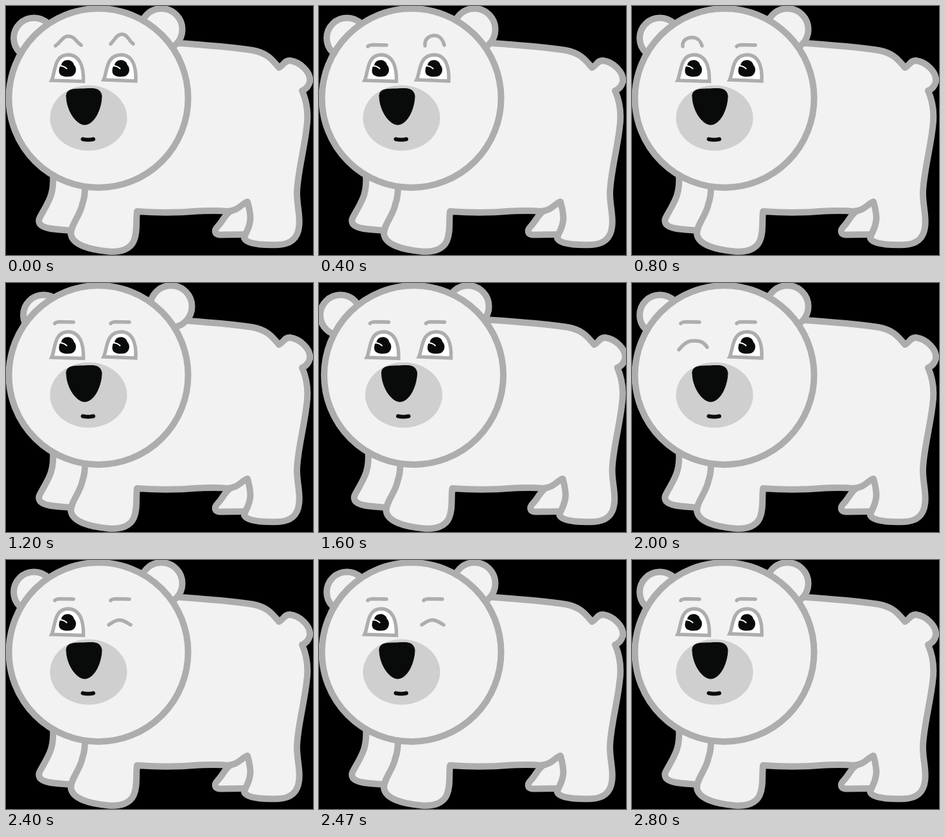
These frames come from a looping animation (478 by 388 pixels, 3.19 s). An HTML page with a canvas:

```html
<!DOCTYPE html>
<html lang="en">
<head>
<meta charset="utf-8">
<title>Polar bear</title>
<style>
html, body { margin: 0; width: 100%; height: 100%; overflow: hidden; background: #000; }
canvas { display: block; }
</style>
</head>
<body>
<canvas id="stage" width="478" height="388"></canvas>
<script>
const ctx = document.getElementById('stage').getContext('2d');
const LOOP = 3190;
const FUR = '#f2f2f2', LINE = '#adadad', MUZZLE = '#cfcfcf', INK = '#090b0a', WHITE = '#fff';

const body = new Path2D(`M262 57.500 C300 60 345 63 384 69 C406 73 414 83 425 96
  C433 92 433 85 442 85 C458 87 475 103 473 118 C471 126 466 130 461 132
  C469 150 471 170 468 190 C464 225 453 265 453 292 C453 312 459 330 456 345
  C454 362 443 371 425 372 C400 373 375 371 371 362 C371 355 380 348 380.500 330
  C380 320 378 312 376 305 C366 309 362 319 345 320 C330 318 315 319 300 319.500
  C260 323 230 322 204 320 C202 337 205 352 199 366 C194 378 180 384 160 382.500
  C130 380 103 372 101 355 C101 340 116 326 119 308 Q123 298 123 280`);
const farFrontLeg = new Path2D(`M73 262 C75 290 68 302 59 318 C52 331 49 333 53 340
  C60 348 80 348 101 350 L140 350 L140 262`);
const farHindLeg = new Path2D(`M350 319 C341 325 337 336 330 343
  C323 350 325 356 333 356.500 L373 356 L400 356 L400 290`);
const nose = new Path2D(`M94 140 C94 130 103 129 122 129 C138 128 147 128 149 140
  C149 157 139 185 122 185 C108 184 94 161 94 140Z`);
const mouth = new Path2D('M119.500 207.500 Q128 209.500 136 207.500');
const pupil = new Path2D(`M-9.500 -4 C-9 -15 8 -16 10.500 -5 C16 0 14 13 3 13
  C-9 14 -15 10 -12.500 0 C-12 -4 -9 -3 -9.500 -4Z`);
const glint = new Path2D('M-12 -4 Q-5 -3.500 -1 0.500');

const eyes = {
  left: { x: 95.5, y: 97, lid: new Path2D('M71 116 C77 104 74 76 97 76 C115 76.500 121 95 120.500 117.500Z') },
  right: { x: 178.5, y: 97, lid: new Path2D('M152 115 C158 103 155 76 180 76 C197 77 203 94 202 117Z') }
};
const winks = {
  left: new Path2D('M73 104 C83 92 88 90 97 90 C106 90 112 92 117 100'),
  right: new Path2D('M160 101 C169 95 172 93.500 177 93.500 C182 93.500 186 96 194 101')
};
const brows = {
  left: {
    flat: new Path2D('M76 63 Q78 60.500 85 60.500 L105 61'),
    peak: new Path2D('M77 62 C86 56 88 47 97 47 C107 47 109 56 117 61'),
    arch: new Path2D('M79 63 C78 53 86 49 94 49 C102 49 107 55 109 62')
  },
  right: {
    flat: new Path2D('M163 63 Q165 60.500 172 60.500 L192 61'),
    peak: new Path2D('M163 59 C170 52 172 44 181 44 C190 45 191 54 198 59'),
    arch: new Path2D('M165 62 C164 51 172 46 180 46 C188 46 193 53 195 61')
  }
};

// Each pose holds until the next one begins.
const poses = [
  { at: 0, left: 'peak', right: 'peak' },
  { at: 400, right: 'arch' },
  { at: 800, left: 'arch' },
  { at: 1200, ears: 15 },
  { at: 1600, ears: -13.5, shift: 3.5 },
  { at: 2000, wink: 'left' },
  { at: 2400, wink: 'right' },
  { at: 2800 }
];

function stroke(path, width, color = LINE) {
  ctx.lineWidth = width;
  ctx.strokeStyle = color;
  ctx.stroke(path);
}

function shape(path, width = 10, fill = FUR, line = LINE) {
  ctx.fillStyle = fill;
  ctx.fill(path);
  if (width) stroke(path, width, line);
}

function ellipse(x, y, rx, ry = rx) {
  const path = new Path2D();
  path.ellipse(x, y, rx, ry, 0, 0, Math.PI * 2);
  return path;
}

function drawEye(side, wink) {
  if (wink === side) {
    stroke(winks[side], 5.5);
    return;
  }
  const { x, y, lid } = eyes[side];
  shape(lid, 5.5, WHITE);
  ctx.save();
  ctx.translate(x, y);
  shape(pupil, 0, INK);
  stroke(glint, 2, WHITE);
  ctx.restore();
}

function draw({ left = 'flat', right = 'flat', ears = 0, shift = 0, wink }) {
  ctx.fillStyle = '#000';
  ctx.fillRect(0, 0, 478, 388);
  ctx.save();
  ctx.translate(shift, 0);
  ctx.lineCap = ctx.lineJoin = 'round';
  [farFrontLeg, farHindLeg, body].forEach(path => shape(path));
  shape(ellipse(43.5 + ears, 50, 31.5));
  shape(ellipse(242 + ears, 36.5, 32.5));
  shape(ellipse(144, 143.5, 139.5));

  shape(ellipse(128.5, 174.5, 60, 51), 0, MUZZLE);
  shape(nose, 1, INK, INK);
  stroke(mouth, 6, INK);
  stroke(brows.left[left], 5.5);
  stroke(brows.right[right], 5.5);
  ctx.lineJoin = 'miter';
  drawEye('left', wink);
  drawEye('right', wink);
  ctx.restore();
}

function tick() {
  const time = performance.now() % LOOP;
  draw(poses.filter(pose => pose.at <= time).pop());
  requestAnimationFrame(tick);
}
tick();
</script>
</body>
</html>
```
